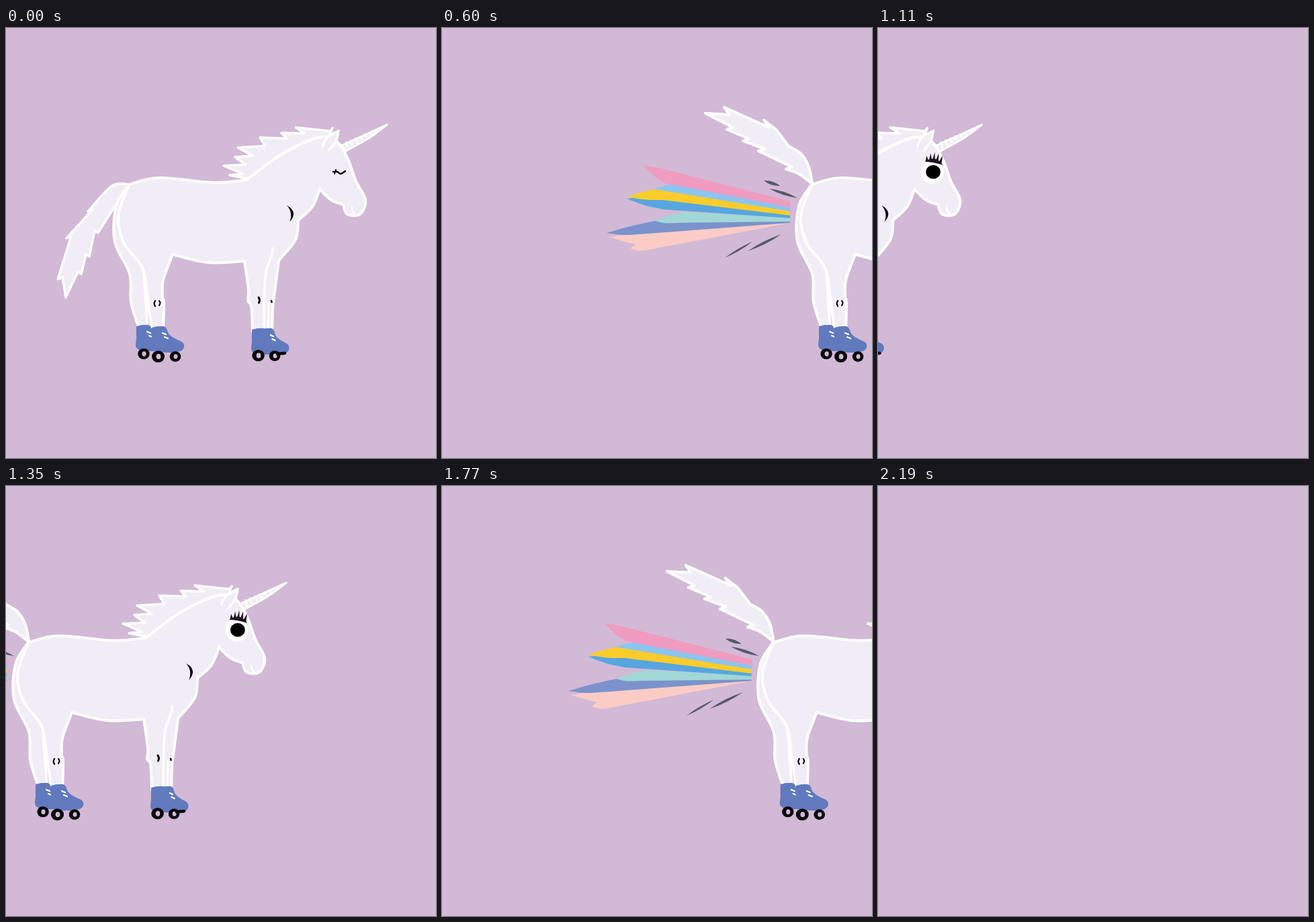
An HTML page with a canvas that plays this animation: 640 by 640 pixels, repeating every 2.28 s.

```html
<!DOCTYPE html>
<html lang="en">
<head>
<meta charset="utf-8">
<title>Unicorn on roller skates</title>
<style>
html, body { margin: 0; width: 100%; height: 100%; overflow: hidden; background: #d2b9d6; }
canvas { display: block; width: 100vw; height: 100vh; }
</style>
</head>
<body>
<canvas id="stage" width="640" height="640"></canvas>
<script>
const ctx = document.getElementById('stage').getContext('2d');
const LOOP = 2280, STEP = 30, WAKE = 180, GO = 330, REENTER = 930;
const BG = '#d2b9d6', COAT = '#f1edf6', WHITE = '#ffffff', BOOT = '#617abe', BLACK = '#050306';

// Joins runs of points; each run is a smooth curve, corners sit between runs.
function shape(runs, closed = true) {
  const path = new Path2D();
  runs.forEach((run, r) => {
    const n = run.length / 2;
    const at = i => {
      const j = Math.max(0, Math.min(n - 1, i)) * 2;
      return [run[j], run[j + 1]];
    };
    path[r ? 'lineTo' : 'moveTo'](...at(0));
    for (let i = 0; i < n - 1; i++) {
      const [a, b, c, d] = [at(i - 1), at(i), at(i + 1), at(i + 2)];
      path.bezierCurveTo(
        b[0] + (c[0] - a[0]) / 6, b[1] + (c[1] - a[1]) / 6,
        c[0] - (d[0] - b[0]) / 6, c[1] - (d[1] - b[1]) / 6, c[0], c[1]);
    }
  });
  if (closed) path.closePath();
  return path;
}
const line = (...pts) => shape([pts], false);

// Tufts of hair: a notch between each pair of tips, at share u of the way plus an offset.
function tufts(tips, u, dx, dy) {
  const runs = [];
  for (let i = 0; i + 3 < tips.length; i += 2) {
    const [x, y, nx, ny] = tips.slice(i, i + 4);
    runs.push([x, y, x + (nx - x) * u + dx, y + (ny - y) * u + dy]);
  }
  runs.push(tips.slice(-2));
  return runs;
}

// A stroke that tapers at both ends and may bend sideways.
function lens(x1, y1, x2, y2, width, bend = 0) {
  const len = Math.hypot(x2 - x1, y2 - y1);
  const nx = (y1 - y2) / len, ny = (x2 - x1) / len;
  const mx = (x1 + x2) / 2, my = (y1 + y2) / 2;
  const path = new Path2D();
  path.moveTo(x1, y1);
  for (const [side, x, y] of [[1, x2, y2], [-1, x1, y1]]) {
    const off = bend * 2 + side * width;
    path.quadraticCurveTo(mx + nx * off, my + ny * off, x, y);
  }
  return path;
}

function fill(path, color) {
  ctx.fillStyle = color;
  ctx.fill(path);
}
function stroke(path, color, width) {
  ctx.strokeStyle = color;
  ctx.lineWidth = width;
  ctx.stroke(path);
}
function coat(path, width = 4) {
  fill(path, COAT);
  stroke(path, WHITE, width);
}
function dot(x, y, r, color, ry = r) {
  ctx.fillStyle = color;
  ctx.beginPath();
  ctx.ellipse(x, y, r, ry, 0, 0, Math.PI * 2);
  ctx.fill();
}

const body = shape([
  [183, 233, 228, 223, 310, 230, 358, 226],
  [358, 226, 410, 188, 465, 163, 492, 169, 508, 193, 521, 228, 535, 256, 527, 277, 508, 277, 502, 263],
  [502, 263, 484, 256, 467, 240],
  [467, 240, 456, 266, 435, 286],
  [435, 286, 431, 315, 406, 346],
  [406, 346, 399, 400, 397, 416, 396, 452],
  [367, 452, 365, 414, 360, 406, 361, 390, 355, 347],
  [355, 347, 300, 349, 248, 337],
  [248, 337, 234, 375, 233, 400, 235, 409, 234, 450],
  [217, 450, 211, 405, 203, 357, 176, 321, 167, 280, 183, 233]
]);
const farLeg = shape([
  [183, 233, 164, 265, 162, 318, 184, 366, 186, 408, 198, 447],
  [211, 447, 208, 405, 205, 360]
]);
const mane = shape([
  [358, 224],
  ...tufts([333, 219, 324, 205, 341, 192, 345, 178, 378, 163, 410, 156, 431, 148, 486, 149], .5, 24, 5),
  [478, 167, 430, 178, 358, 226]
]);
const horn = shape([[497, 176, 530, 161, 567, 144], [567, 144, 540, 164, 504, 184]]);
const ear = shape([[471, 176, 478, 163, 495, 153], [495, 153, 491, 169, 481, 182]], false);
const tailDown = shape([
  [185, 233, 158, 235, 122, 273],
  ...tufts([122, 273, 90, 313, 77, 374, 89, 401], 0, 7, -3),
  ...tufts([89, 401, 112, 366, 124, 340, 137, 305], 1, -5, -3),
  [137, 305, 163, 264, 185, 233]
]);
const tailUp = shape([
  [184, 232, 179, 207, 167, 187, 149, 176],
  [130, 151, 112, 137],
  ...tufts([112, 137, 53, 118, 25, 127], 0, 8, 11),
  ...tufts([25, 127, 57, 151, 81, 168, 104, 183, 145, 210], 1, 9, -3),
  [145, 210, 164, 217, 184, 232]
]);

// Each ray: tip, upper shoulder, lower shoulder, then its top and bottom at the narrow end.
const NARROW = 151;
function ray(tx, ty, ux, uy, lx, ly, top, bottom) {
  return shape([
    [tx, ty, (tx + ux) / 2, (ty + uy) / 2 - 1, ux, uy], [NARROW, top],
    [NARROW, bottom], [lx, ly, (tx + lx) / 2, (ty + ly) / 2 + 2, tx, ty]
  ]);
}
const rays = [
  ['#fbccc5', ray(-118, 311, -68, 306, -58, 325, 288, 289)],
  ['#fbccc5', ray(-87, 328, -60, 310, -65, 331, 288, 290)],
  ['#7b92cc', ray(-122, 305, -50, 287, -73, 307, 288, 290)],
  ['#a1d7d7', ray(-51, 287, -7, 274, -18, 290, 282, 288)],
  ['#8cc5f1', ray(-52, 240, -22, 232, -18, 248, 267, 274)],
  ['#57a6e0', ray(-92, 254, -50, 252, -38, 270, 277, 283)],
  ['#fccc2b', ray(-92, 251, -50, 240, -38, 256, 273, 279)],
  ['#f09bc0', ray(-67, 205, -33, 211, -36, 231, 258, 267)]
];
const streaks = [
  lens(112, 227, 136, 235, 5), lens(120, 239, 162, 253, 4.5),
  lens(54, 342, 95, 318, 3), lens(88, 332, 138, 307, 4)
];

function boot(x, y, s) {
  const unit = [0, 2, 10, 0, 20, 1, 26, 12, 36, 19, 46, 24, 48, 31, 42, 37, 23, 39, 1, 35, 0, 18, 0, 2];
  fill(shape([unit.map((v, i) => i % 2 ? y + v : x + v * s)]), BOOT);
  for (const lace of [0, 1]) {
    const lx = x + (16 + lace * 3) * s, ly = y + 10 + lace * 6;
    stroke(line(lx, ly, lx + 5 * s, ly + 2), WHITE, 2.2);
  }
}

function wheel(x, y, r) {
  dot(x, y, r, BLACK, r * .92);
  dot(x + .5, y, r * .36, BG, r * .42);
}

function skates() {
  boot(194, 442, 1);
  boot(217, 444, 1);
  boot(366, 447, 1);
  boot(380, 447, .86);
  wheel(205, 485, 8.7);
  wheel(226.5, 489, 9.5);
  wheel(252, 489, 8.3);
  wheel(375.5, 487.5, 9.3);
  wheel(400, 488, 8.3);
  stroke(line(404, 485, 415, 484), BLACK, 4.5);
}

function eye(open) {
  if (!open) {
    stroke(line(487, 214, 493, 214, 498, 217, 505, 213), BLACK, 2.4);
    stroke(line(489, 217, 491, 211), BLACK, 1.8);
    return;
  }
  dot(493.5, 214.5, 17, WHITE);
  dot(494.8, 214.3, 10.8, '#000', 10.3);
  const lash = '#1d131f';
  fill(lens(482, 199, 509, 204, 6, -4), lash);
  for (let i = 0; i < 5; i++) {
    const x = 486 + i * 4.7, y = 198 + i * .6;
    fill(shape([[x - 2.5, y], [485 + i * 6, 190 - 5 * Math.sin(i * Math.PI / 4)], [x + 2.5, y + 1]]), lash);
  }
}

function blast() {
  for (const [color, path] of rays) fill(path, color);
  for (const s of streaks) fill(s, '#555970');
  coat(tailUp);
}

function details() {
  stroke(line(397, 328, 396, 337, 386, 370, 384, 450), WHITE, 3.5);
  stroke(line(391, 408, 390, 450), WHITE, 3);
  stroke(line(515, 267, 516, 273, 519, 276), WHITE, 2.5);
  fill(lens(418, 264, 422, 289, 4, -6), BLACK);
  stroke(line(222, 406, 220.5, 410, 222, 414), BLACK, 2.2);
  stroke(line(228, 406, 229.5, 409, 228, 413), BLACK, 2);
  stroke(line(376, 401, 377.5, 405, 376.5, 409), BLACK, 3);
  stroke(line(395, 406, 395.5, 408), BLACK, 2.6);
}

function unicorn(awake, blasting) {
  if (blasting) blast();
  else coat(tailDown, 3.5);
  coat(farLeg);
  coat(mane, 3.5);
  coat(horn, 3);
  for (let i = 0; i < 7; i++) {
    const x = 507 + i * 7, y = 173 - i * 3.4, h = 5.5 - i * .6;
    stroke(line(x - 1, y - h + 2, x + 2, y + h), WHITE, 2);
  }
  coat(body);
  coat(ear, 3.5);
  details();
  skates();
  eye(awake);
}

// Rolls off to the right, then crosses the whole stage once at a steady pace.
const place = t => t < GO ? 0 : t < REENTER ? (t - 324) * 1.33 : (t - 1487) * 1.0945;

function draw(t) {
  ctx.fillStyle = BG;
  ctx.fillRect(0, 0, 640, 640);
  ctx.lineCap = ctx.lineJoin = 'round';
  ctx.save();
  ctx.translate(place(t), 0);
  unicorn(t >= WAKE, t >= GO);
  ctx.restore();
}

const start = performance.now();
function tick() {
  const t = (performance.now() - start) % LOOP;
  draw(Math.floor(t / STEP) * STEP);
  requestAnimationFrame(tick);
}
tick();
</script>
</body>
</html>
```
